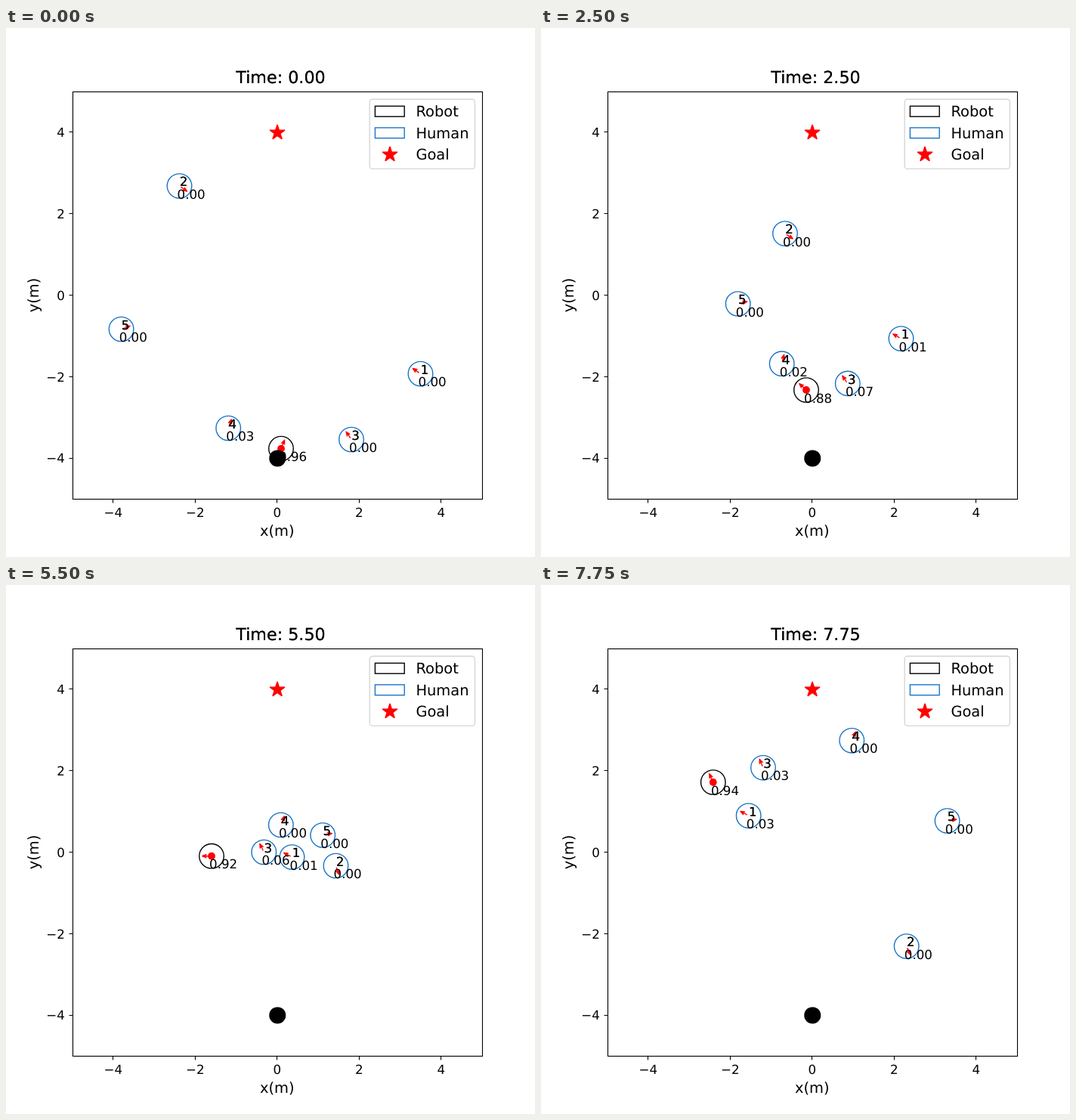
These frames come from a looping animation (700 by 700 pixels, 8000 ms). An HTML page:

```html
<!DOCTYPE html>
<html lang="en">
<head>
<meta charset="utf-8">
<title>Crowd navigation plot</title>
<style>
  html, body { margin: 0; width: 100%; height: 100%; overflow: hidden; background: #fff; }
  svg { display: block; width: 700px; height: 700px; }
  text { font-family: "DejaVu Sans", sans-serif; text-rendering: geometricPrecision; white-space: pre; }
</style>
</head>
<body>
<svg id="stage" viewBox="0 0 700 700" xmlns="http://www.w3.org/2000/svg"></svg>
<script>
const STEP = 0.25, STEPS = 32;
const SMALL = 16.667, MEDIUM = 19.444, LARGE = 22.222;
const BLUE = '#1874c8', RED = '#ff0000', LINE = 1.389;
const CX = 358.75, CY = 353.5, SX = 54.25, SY = 53.9;
const stage = document.getElementById('stage');

function add(parent, tag, attrs, content) {
  const el = document.createElementNS('http://www.w3.org/2000/svg', tag);
  for (const key in attrs) el.setAttribute(key, attrs[key]);
  if (content !== undefined) el.textContent = content;
  parent.appendChild(el);
  return el;
}

const label = (parent, x, y, size, content, more) =>
  add(parent, 'text', { x, y, 'font-size': size, ...more }, content);

function star(x, y) {
  let d = '';
  for (let i = 0; i < 10; i++) {
    const r = i % 2 ? 3.98 : 10.42, a = i * Math.PI / 5;
    d += (i ? 'L' : 'M') + (x + r * Math.sin(a)).toFixed(2) + ' ' + (y - r * Math.cos(a)).toFixed(2);
  }
  add(stage, 'path', { d: d + 'Z', fill: RED, stroke: RED, 'stroke-width': LINE, 'stroke-linejoin': 'bevel' });
}

function segment(rows, t) {
  let i = 0;
  while (i < rows.length - 2 && t >= rows[i + 1][0]) i++;
  const span = rows[i + 1][0] - rows[i][0];
  return { i, span, u: (t - rows[i][0]) / span };
}

function linear(rows, t, col) {
  const { i, u } = segment(rows, t);
  return rows[i][col] + (rows[i + 1][col] - rows[i][col]) * u;
}

function smooth(rows, t, col) {
  const { i, span, u } = segment(rows, t);
  const slope = k => {
    const a = rows[Math.max(k - 1, 0)], b = rows[Math.min(k + 1, rows.length - 1)];
    return (b[col] - a[col]) / (b[0] - a[0]);
  };
  const p = rows[i][col], q = rows[i + 1][col], v = 1 - u;
  return p * v * v * (1 + 2 * u) + q * u * u * (3 - 2 * u)
    + span * u * v * (slope(i) * v - slope(i + 1) * u);
}

// Waypoints at shared times; scores in hundredths
const times = [0, 1, 2.5, 3.5, 5.5, 6.5, 7.75];
const humans = [
  { x: [548.5, 520.5, 476.5, 445, 378.5, 334, 274.7], y: [457.5, 437.5, 411, 395, 360, 337.5, 305.3], score: [0, 1, 1, 2, 1, 3, 3] },
  { x: [229.5, 258.5, 323, 364, 436.5, 458.5, 483.7], y: [209, 230, 272, 302, 371.5, 420.7, 478], bend: [5.25, 432, 359] },
  { x: [457, 438, 405.8, 384, 341.3, 320.5, 294], y: [544.5, 515.7, 470.4, 434.7, 353.5, 304, 241.8], score: [0, 4, 7, 4, 6, 2, 3] },
  { x: [294.2, 306.8, 318.7, 331, 363.8, 384.9, 411.3], y: [529.5, 496.8, 444.2, 405, 317.5, 267.8, 205.8], score: [3, 2, 2, 1, 0, 0, 0] },
  { x: [152.6, 187.4, 260.7, 313.4, 419.2, 472.8, 537.6], y: [398.5, 385, 365, 352.5, 331, 322.5, 312] }
];
const robot = {
  x: [364, 379.4, 351, 311.2, 272, 242.3, 227.8],
  y: [556.6, 505.6, 479, 447, 358.7, 315, 261],
  turn: [292, 270, 222, 249, 180, 248, 246],
  score: [96, 93, 88, 93, 92, 95, 94]
};

function pathOf({ x, y, turn, bend }) {
  const rows = times.map((t, i) => [t, x[i], y[i]]);
  if (bend) rows.push(bend);
  // The robot reaches each waypoint with one full stride along its heading
  if (turn) times.forEach((t, i) => {
    const a = turn[i] * Math.PI / 180;
    rows.push([t - STEP, x[i] - 13.4 * Math.cos(a), y[i] - 13.4 * Math.sin(a)]);
  });
  return rows.sort((a, b) => a[0] - b[0]);
}

function drawAxes() {
  const axis = { stroke: '#000', 'stroke-width': 1.11, fill: 'none' };
  const mid = { 'text-anchor': 'middle' };
  let ticks = '';
  for (let v = -4; v <= 4; v += 2) {
    const x = CX + v * SX, y = CY - v * SY;
    const name = String(v).replace('-', '\u2212');
    ticks += `M${Math.floor(x) + .5} 623.5v5M88.5 ${Math.floor(y) + .5}h-5`;
    label(stage, x, 647, SMALL, name, mid);
    label(stage, 77.8, y + 6.3, SMALL, name, { 'text-anchor': 'end' });
  }
  add(stage, 'path', { d: ticks, ...axis });
  add(stage, 'rect', { x: 88.5, y: 84.5, width: 542, height: 539, ...axis });
  label(stage, CX, 671.5, MEDIUM, 'x(m)', mid);
  label(stage, 0, 0, MEDIUM, 'y(m)', { ...mid, transform: `translate(43 ${CY}) rotate(-90)` });
}

function drawLegend() {
  add(stage, 'rect', { x: 481.2, y: 94.2, width: 139.2, height: 92.2, rx: 3.9, fill: '#fff', stroke: '#d6d6d6', 'stroke-width': LINE });
  ['Robot', 'Human', 'Goal'].forEach((name, i) => {
    const y = 117 + i * 28.55;
    if (i < 2) add(stage, 'rect', { x: 488.4, y: y - 13.6, width: 38.8, height: 13.8, fill: 'none', stroke: i ? BLUE : '#000', 'stroke-width': LINE });
    else star(508, y - 6.7);
    label(stage, 542.4, y, MEDIUM, name);
  });
}

drawAxes();
const shapes = add(stage, 'g', {});
star(CX + .3, CY - 4 * SY + .5);
add(stage, 'circle', { cx: CX + .5, cy: 569.4, r: 11 });
const notes = add(stage, 'g', {});
drawLegend();
// The heading is laid twice, which makes its edges heavier
const titles = [0, 1].map(() => label(stage, 304.3, 73.3, LARGE, ''));

function makeAgent(data, name) {
  const body = add(shapes, 'g', {}), note = add(notes, 'g', {});
  add(body, 'ellipse', { rx: 16.275, ry: 16.17, fill: 'none', stroke: name ? BLUE : '#000', 'stroke-width': LINE });
  const arrow = add(body, 'path', {
    d: 'M2.8 0H12.3M7 -2.1L12.3 0L7 2.1', fill: RED, stroke: RED, 'stroke-width': LINE,
    'stroke-linecap': 'round', 'stroke-linejoin': 'round'
  });
  if (name) for (let i = 0; i < 2; i++) label(note, .2, .4, SMALL, name);
  else add(body, 'circle', { r: 4.9, fill: RED });
  const score = label(note, -2.9, 16.6, SMALL, '');

  const path = pathOf(data);
  const scores = times.map((t, i) => [t, data.score ? data.score[i] : 0]);
  const ease = name ? smooth : linear;
  const at = t => [ease(path, t, 1), ease(path, t, 2)];

  return t => {
    const [x, y] = at(t), [px, py] = at(t - STEP);
    const move = `translate(${x.toFixed(2)} ${y.toFixed(2)})`;
    body.setAttribute('transform', move);
    note.setAttribute('transform', move);
    const deg = Math.atan2(y - py, x - px) * 180 / Math.PI;
    arrow.setAttribute('transform', `rotate(${deg.toFixed(1)})`);
    score.textContent = (Math.round(linear(scores, t, 1)) / 100).toFixed(2);
  };
}

const agents = humans.map((data, i) => makeAgent(data, i + 1));
agents.push(makeAgent(robot, 0));

function loop() {
  const t = Math.floor(performance.now() / 1000 / STEP) % STEPS * STEP;
  titles.forEach(el => { el.textContent = 'Time: ' + t.toFixed(2); });
  agents.forEach(update => update(t));
  requestAnimationFrame(loop);
}
loop();
</script>
</body>
</html>
```
